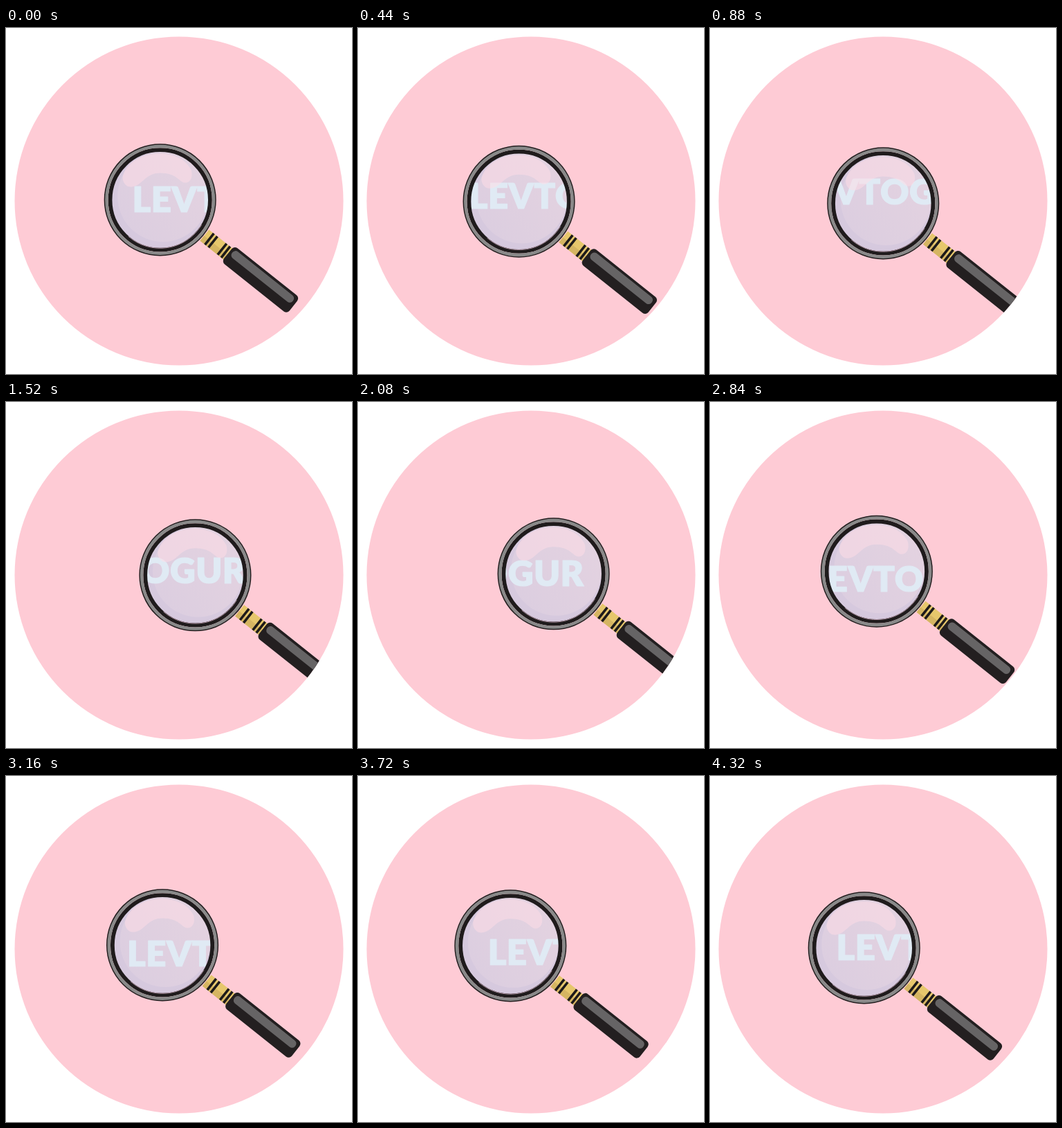
An HTML page for the animation above (4360 ms loop, 500 px wide and 500 px high).

```html
<!DOCTYPE html>
<html lang="en">
<head>
<meta charset="utf-8">
<title>Magnifier</title>
<style>
  html, body { margin: 0; width: 100%; height: 100%; overflow: hidden; background: #fff; }
  svg { display: block; width: 100%; height: 100%; }
  #word {
    font: 900 51px Lato, "Open Sans", sans-serif;
    letter-spacing: .4px;
    fill: #e0eaf4; stroke: #e0eaf4; stroke-width: 1.2; stroke-linejoin: round;
  }
</style>
</head>
<body>
<svg viewBox="0 0 500 500">
  <defs>
    <clipPath id="disc"><circle cx="250" cy="250" r="237.5"/></clipPath>
    <clipPath id="pane"><circle r="70"/></clipPath>
    <linearGradient id="tint" x1=".9" y1=".2" x2=".1" y2=".8">
      <stop offset="0" stop-color="#e3d2e0"/>
      <stop offset="1" stop-color="#dccee0"/>
    </linearGradient>
  </defs>
  <circle cx="250" cy="250" r="237.5" fill="#fecbd5"/>
  <g clip-path="url(#disc)">
    <g id="magnifier">
      <g transform="rotate(38.5)">
        <rect x="82" y="-10.3" width="46" height="20.6" fill="#e6c76c"/>
        <rect x="82" y="1" width="46" height="9.3" fill="#d5b562"/>
        <path d="M91 -10.3v20.6M97.5 -10.3v20.6M114.5 -10.3v20.6M121 -10.3v20.6" stroke="#1d1a1a" stroke-width="3.6"/>
        <rect x="125" y="-15" width="121" height="29.8" rx="6" fill="#231f20"/>
        <rect x="129" y="-11.3" width="112" height="12" rx="5.5" fill="#666465"/>
      </g>
      <g clip-path="url(#pane)">
        <circle r="70" fill="#d6c9de"/>
        <circle cx="4" cy="-5" r="65.5" fill="url(#tint)"/>
        <text id="word">LEVTOGUR</text>
        <path fill="#ffdce6" fill-opacity=".52" d="M-54 -34C-48 -58 -22 -67 0 -67C20 -67 38 -58 45 -43C48 -32 43 -24 35 -25C28 -26 24 -39 0 -39C-22 -39 -26 -20 -41 -19C-50 -18 -55 -27 -54 -34Z"/>
      </g>
      <circle r="72.2" fill="none" stroke="#1f1b1c" stroke-width="5.8"/>
      <path d="M60 36A70 70 0 0 1 -46 52.7" fill="none" stroke="#a58a98" stroke-width="1"/>
      <circle r="77.6" fill="none" stroke="#898989" stroke-width="5"/>
      <circle r="80.3" fill="none" stroke="#231f20" stroke-width="1.5"/>
    </g>
  </g>
</svg>
<script>
  const LOOP = 4360;
  const PARALLAX = 2.2;
  const HOME = { x: 222.7, y: 248.4 };

  // Lens centre along its path: [time, x, y]
  const path = [
    [0, 222.7, 248.4], [560, 236, 251.4], [880, 250.2, 253.4], [1120, 262, 252.8],
    [1520, 273.4, 250.3], [1680, 277.5, 249.4], [2080, 282.6, 248.3], [2240, 276, 247.6],
    [2520, 260.2, 246.3], [2800, 243, 244.8], [3160, 226.1, 244.4], [3360, 222.7, 244.4],
    [3680, 220.4, 245.2], [3920, 221, 246.4], [4320, 222.7, 248.4]
  ];

  const magnifier = document.getElementById("magnifier");
  const word = document.getElementById("word");

  function key(i) {
    const n = path.length, turn = Math.floor(i / n), p = path[i - turn * n];
    return [p[0] + turn * LOOP, p[1], p[2]];
  }

  const slope = (i, axis) => {
    const a = key(i - 1), b = key(i + 1);
    return (b[axis] - a[axis]) / (b[0] - a[0]);
  };

  // Smooth cyclic Hermite curve through the path points
  function lensAt(t) {
    let i = path.length - 1;
    while (path[i][0] > t) i--;
    const a = key(i), b = key(i + 1), span = b[0] - a[0];
    const u = (t - a[0]) / span, v = 1 - u;
    const at = axis =>
      v * v * (1 + 2 * u) * a[axis] + u * u * (3 - 2 * u) * b[axis] +
      span * u * v * (v * slope(i, axis) - u * slope(i + 1, axis));
    return { x: at(1), y: at(2) };
  }

  function draw(t) {
    const { x, y } = lensAt(t);
    magnifier.setAttribute("transform", `translate(${x} ${y})`);
    word.setAttribute("x", 182.5 - PARALLAX * (x - HOME.x) - x);
    word.setAttribute("y", 266 - PARALLAX * (y - HOME.y) - y);
  }

  const start = performance.now();
  function tick() {
    draw((performance.now() - start) % LOOP);
    requestAnimationFrame(tick);
  }
  draw(0);
  requestAnimationFrame(tick);
</script>
</body>
</html>
```
